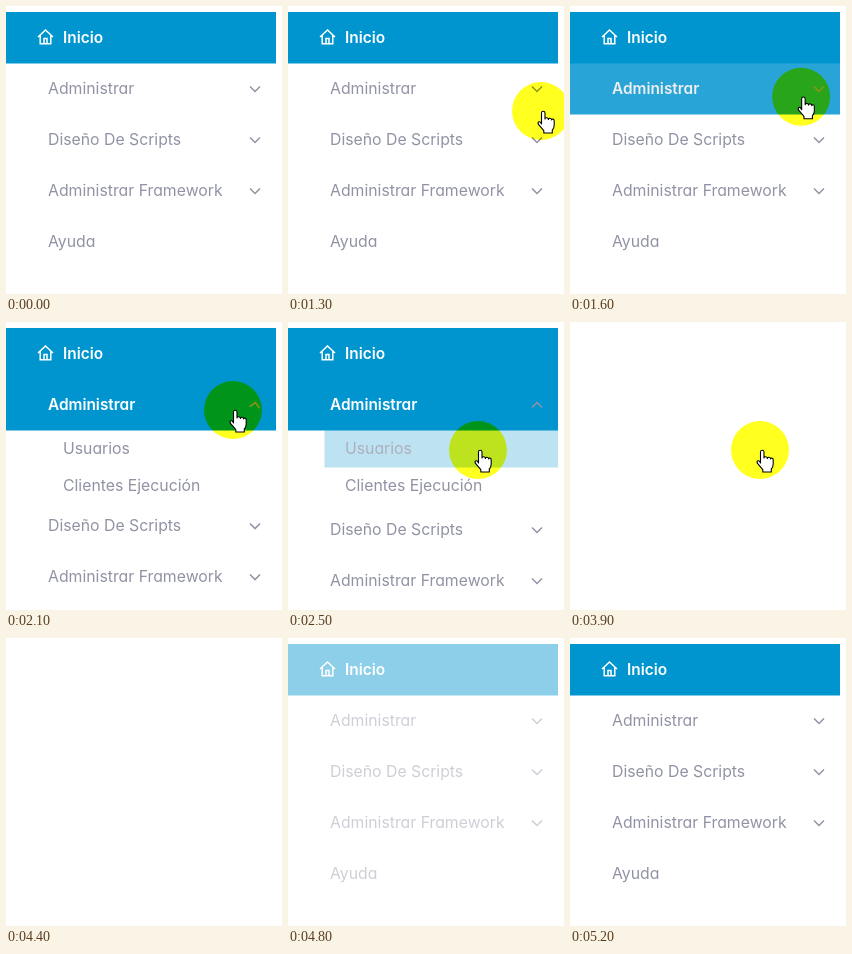
Animation of 276 by 288 pixels, one loop 5300 ms. Source, as an HTML page:

```html
<!DOCTYPE html>
<html lang="es">
<head>
<meta charset="utf-8">
<title>Menú lateral</title>
<style>
  html, body { margin: 0; width: 100%; height: 100%; overflow: hidden; background: #fff; }
  svg { display: block; width: 276px; height: 288px; }
  text { font: 15.8px Inter, "Open Sans", sans-serif; font-feature-settings: "cv11"; }
  .strong { font-size: 15.4px; font-weight: 600; }
  .line { fill: none; stroke-width: 1.5; }
  #spot { mix-blend-mode: multiply; }
</style>
</head>
<body>
<svg viewBox="0 0 276 288">
  <defs>
    <clipPath id="fold"><rect id="foldBox" y="108" width="276" height="0"/></clipPath>
  </defs>
  <rect width="276" height="288" fill="#fff"/>
  <g id="menu">
    <rect y="6" width="270" height="51.5" fill="#0095cf"/>
    <path class="line" stroke="#fff" d="M32 31 39.5 24 47 31M34.2 29.5V37.8H44.8V29.5M38 37.8V32.5H41V37.8"/>
    <text class="strong" x="57" y="37" fill="#fff">Inicio</text>
    <g id="rows"></g>
    <g id="submenu" clip-path="url(#fold)"></g>
  </g>
  <circle id="spot" r="29" fill="#ffff20"/>
  <path id="hand" fill="#fff" stroke="#000" stroke-width="1.1" stroke-linejoin="round"
    d="M.5 13V2Q.5.3 2.2.3T4 2V8Q4 6.6 5.7 6.7T7.4 8.4Q7.4 7.1 9 7.2T10.6 8.9Q10.8 7.9 12 8.1T13.2 9.8V14Q13.2 17 11.3 19V22H2.8V19.6L-2.5 13.4Q-3.6 11.4-2.1 10.8T.5 13Z"/>
</svg>
<script>
const LOOP = 5300, STEP = 100;
const GREY = [145, 147, 165], WHITE = [255, 255, 255];
const FOLD_HEIGHT = 74;
const byId = id => document.getElementById(id);

const clamp = v => Math.min(1, Math.max(0, v));
const span = (t, from, to) => clamp((t - from) / (to - from));
const smooth = p => p * p * (3 - 2 * p);
const mix = (a, b, p) => a + (b - a) * p;
const blend = p => `rgb(${GREY.map((c, i) => Math.round(mix(c, WHITE[i], p)))})`;

// The CSS "ease" curve, solved by bisection.
function ease(x) {
  const bezier = (s, a, b) => 3 * s * (1 - s) ** 2 * a + 3 * s * s * (1 - s) * b + s ** 3;
  let low = 0, high = 1;
  for (let i = 0; i < 20; i++) {
    const mid = (low + high) / 2;
    if (bezier(mid, .25, .25) < x) low = mid; else high = mid;
  }
  return bezier(low, .1, 1);
}

function set(node, attrs) {
  for (const name in attrs) node.setAttribute(name, attrs[name]);
}

function add(parent, tag, attrs, content = "") {
  const node = document.createElementNS("http://www.w3.org/2000/svg", tag);
  set(node, attrs);
  node.textContent = content;
  return parent.appendChild(node);
}

function makeRow(parent, label, { left, textX, top, height, arrow }) {
  const group = add(parent, "g", {});
  const bar = add(group, "rect", { x: left, y: top, width: 270 - left, height: height + .5, fill: "#0095cf", opacity: 0 });
  const middle = top + height / 2;
  const text = add(group, "text", { x: textX, y: middle + 5, fill: blend(0) }, label);
  const chevron = arrow && add(group, "path", {
    class: "line", stroke: blend(0), d: `M244 ${middle - 2}l5 5 5-5`
  });
  return { group, bar, text, chevron, middle };
}

const rows = ["Administrar", "Diseño De Scripts", "Administrar Framework", "Ayuda"].map((label, i) =>
  makeRow(byId("rows"), label, { left: 0, textX: 42, top: 57 + 51 * i, height: 51, arrow: i < 3 }));
const links = ["Usuarios", "Clientes Ejecución"].map((label, i) =>
  makeRow(byId("submenu"), label, { left: 36.5, textX: 57, top: 108 + 37 * i, height: 37 }));

function highlight(row, amount) {
  set(row.bar, { opacity: amount });
  set(row.text, { fill: blend(amount), class: amount > .5 ? "strong" : "" });
}

function drawMenu(t) {
  const reset = t >= 3900;
  const open = reset ? 0 : ease(span(t, 1850, 2200));
  const shift = FOLD_HEIGHT * open;

  highlight(rows[0], reset ? 0 : smooth(span(t, 1300, 1700)));
  highlight(links[0], reset ? 0 : smooth(span(t, 2400, 2700)));
  set(rows[0].chevron, { transform: `rotate(${-180 * open} 249 ${rows[0].middle + .5})` });
  rows.slice(1).forEach(row => set(row.group, { transform: `translate(0 ${shift})` }));
  set(byId("foldBox"), { height: shift });

  const fadeIn = 1 - (1 - span(t, 4600, 5200)) ** 1.45;
  set(byId("menu"), { opacity: reset ? fadeIn : 1 });
}

function drawPointer(t) {
  const arrive = 1 - (1 - span(t, 1300, 1800)) ** 2;
  const descend = smooth(span(t, 2150, 2500));
  const x = mix(mix(253, 227, arrive), 190, descend);
  const y = mix(mix(105, 88, arrive), 128, descend);
  const press = t >= 3000 && t < 3200 ? 1 : 0;
  const opacity = t < 1300 ? 0 : 1 - span(t, 3900, 4400);

  set(byId("spot"), { cx: x, cy: y, opacity });
  set(byId("hand"), { transform: `translate(${x} ${y - press})`, opacity });
}

function frame(now) {
  const t = Math.floor((now % LOOP) / STEP) * STEP;
  drawMenu(t);
  drawPointer(t);
}

const start = performance.now();
frame(0);
requestAnimationFrame(function tick(now) {
  frame(Math.max(0, now - start));
  requestAnimationFrame(tick);
});
</script>
</body>
</html>
```
